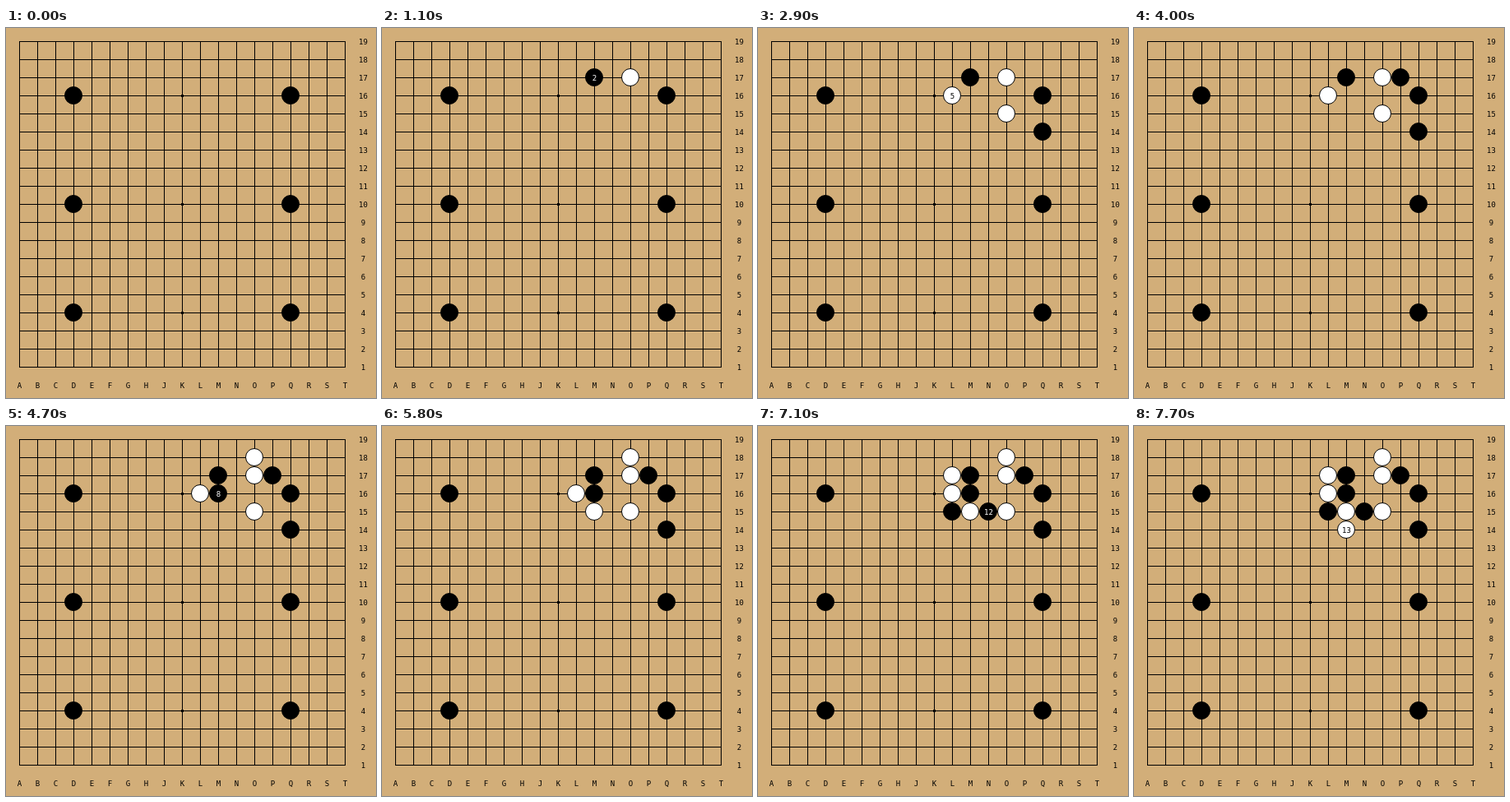
An HTML page with a canvas for the animation above (8 s loop, 450x450 px).

```html
<!DOCTYPE html>
<html lang="en">
<head>
<meta charset="utf-8">
<title>Go opening</title>
<style>
  html, body { margin: 0; width: 100%; height: 100%; overflow: hidden; background: #d2ae79; }
  canvas { display: block; }
</style>
</head>
<body>
<canvas id="board" width="450" height="450"></canvas>
<script>
const ctx = document.getElementById('board').getContext('2d');
const COLUMNS = 'ABCDEFGHJKLMNOPQRST';
const HANDICAP = ['D16', 'Q16', 'D10', 'Q10', 'D4', 'Q4'];
const MOVES = 'O17 M17 O15 Q14 L16 P17 O18 M16 M15 L15 L17 N15 M14'.split(' ');
const LOOP = 8000, FIRST_MOVE = 500, MOVE_TIME = 600, LABEL_TIME = 500;

const columnX = i => 16 + 22 * i;
const rowY = n => 16 + 22 * (19 - n);
const locate = name => [columnX(COLUMNS.indexOf(name[0])), rowY(+name.slice(1))];

function label(text, x, y, color) {
  ctx.fillStyle = color;
  ctx.fillText(text, x + 0.5, y + 4);
}

function stone(name, color) {
  const [x, y] = locate(name);
  ctx.beginPath();
  ctx.arc(x, y, 10.5, 0, 2 * Math.PI);
  ctx.fillStyle = color;
  ctx.fill();
  ctx.stroke();
}

function drawBoard() {
  ctx.fillStyle = '#d2ae79';
  ctx.fillRect(0, 0, 450, 450);
  for (let i = 0; i < 19; i++) {
    const p = columnX(i);
    ctx.fillStyle = '#000';
    ctx.fillRect(p, 16, 1, 397);
    ctx.fillRect(16, p, 397, 1);
    label(COLUMNS[i], p, 434, '#000');
    label(19 - i, 434, p, '#000');
  }
  for (const name of ['K16', 'K10', 'K4']) {
    const [x, y] = locate(name);
    ctx.fillRect(x - 1, y - 1, 3, 3);
  }
  HANDICAP.forEach(name => stone(name, '#000'));
}

function draw(now) {
  const t = now % LOOP;
  ctx.font = '9px "DejaVu Sans Mono", monospace';
  ctx.textAlign = 'center';
  ctx.strokeStyle = '#000';
  drawBoard();
  MOVES.forEach((name, i) => {
    const age = t - FIRST_MOVE - i * MOVE_TIME;
    if (age < 0) return;
    const white = i % 2 === 0;
    stone(name, white ? '#fff' : '#000');
    if (age < LABEL_TIME) label(i + 1, ...locate(name), white ? '#000' : '#fff');
  });
  requestAnimationFrame(draw);
}

draw(performance.now());
</script>
</body>
</html>
```
